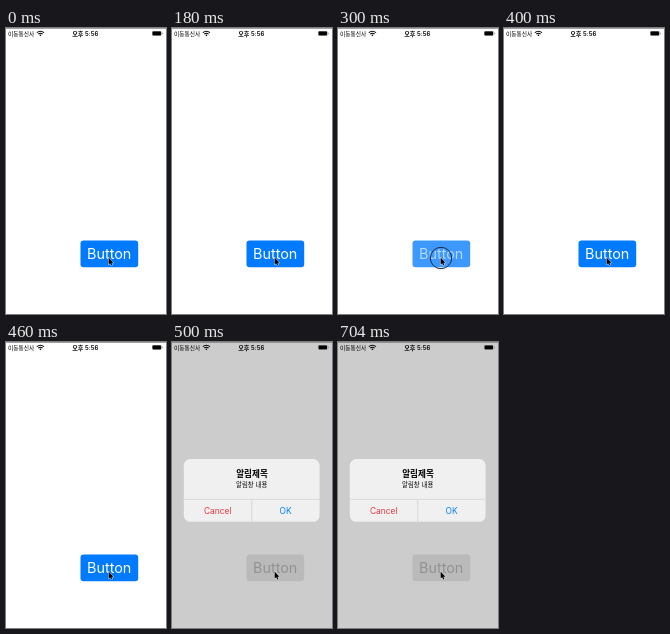
An HTML page that plays this animation: 160x286 px, repeating every 0.84 s.

```html
<!DOCTYPE html>
<html lang="ko">
<head>
<meta charset="utf-8">
<style>
  html, body { margin: 0; width: 100%; height: 100%; overflow: hidden; background: #fff; }
  svg { display: block; width: 100vw; height: 100vh; }
  text { font-family: Inter, "Noto Sans CJK KR", "Noto Sans CJK", sans-serif; text-anchor: middle; }
  .bold { font-weight: 600; }
  #buttonBox { fill: #007aff; }
  #buttonLabel { fill: #fff; }
  #touch, #alert { display: none; }
  .pressed #buttonBox { fill: #3d99ff; }
  .pressed #buttonLabel { fill: #b5d8ff; }
  .pressed #touch, .alerting #alert { display: inline; }
  .alerting #backdrop { fill: #ccc; }
  .alerting #buttonBox { fill: #bababa; }
  .alerting #buttonLabel { fill: #929292; }
</style>
</head>
<body>
<svg id="stage" viewBox="0 0 160 286">
  <rect id="backdrop" width="160" height="286" fill="#fff"/>
  <rect width="160" height=".7" fill="#777"/>

  <!-- Status bar -->
  <text x="2" y="7.6" font-size="5.7" style="text-anchor:start">이동통신사</text>
  <g fill="none" stroke="#000" stroke-width="1.1">
    <path d="M30.8 4.7Q34.4 1.7 38 4.7M32.2 6.1Q34.4 4.3 36.6 6.1"/>
    <path d="M33.3 6.9L34.4 8.2L35.5 6.9Q34.4 6.1 33.3 6.9Z" fill="#000" stroke="none"/>
  </g>
  <text class="bold" x="79.3" y="7.7" font-size="6.1">오후 5:56</text>
  <rect x="146" y="3" width="9.6" height="4.9" rx="1.3" fill="#999"/>
  <rect x="146.6" y="3.6" width="8.4" height="3.7" rx=".8"/>
  <rect x="156" y="4.6" width=".7" height="1.7" rx=".3" fill="#888"/>

  <rect id="buttonBox" x="74.5" y="212.5" width="57.7" height="26.7" rx="3"/>
  <text id="buttonLabel" x="103.2" y="231.2" font-size="14.4">Button</text>

  <g id="alert">
    <rect x="11.8" y="117" width="135.8" height="62.8" rx="6.5" fill="#f0f0f0"/>
    <path d="M11.8 157.3H147.6M79.7 157.3V179.8" stroke="#cacaca" stroke-width=".6"/>
    <text class="bold" x="80" y="134.7" font-size="8.6">알림제목</text>
    <text x="79.7" y="145.2" font-size="6.4">알림창 내용</text>
    <text x="45.7" y="171.8" font-size="8.4" fill="#f0363d">Cancel</text>
    <text x="113.5" y="171.8" font-size="8.4" fill="#087dff">OK</text>
  </g>

  <circle id="touch" cx="103" cy="230" r="10.7" fill="none" stroke="#1b2a3a" stroke-width="1"/>
  <path d="M102.6 229.4V236.6L104.2 235.2L105.2 237.5L106.4 237L105.4 234.7H107.5Z"
        stroke="#fff" stroke-width=".8" paint-order="stroke"/>
</svg>
<script>
  const LOOP = 840;
  const stage = document.getElementById("stage");

  function stateAt(time) {
    if (time >= 500) return "alerting";
    return time >= 300 && time < 400 ? "pressed" : "";
  }

  function draw() {
    stage.setAttribute("class", stateAt(performance.now() % LOOP));
    requestAnimationFrame(draw);
  }
  draw();
</script>
</body>
</html>
```
